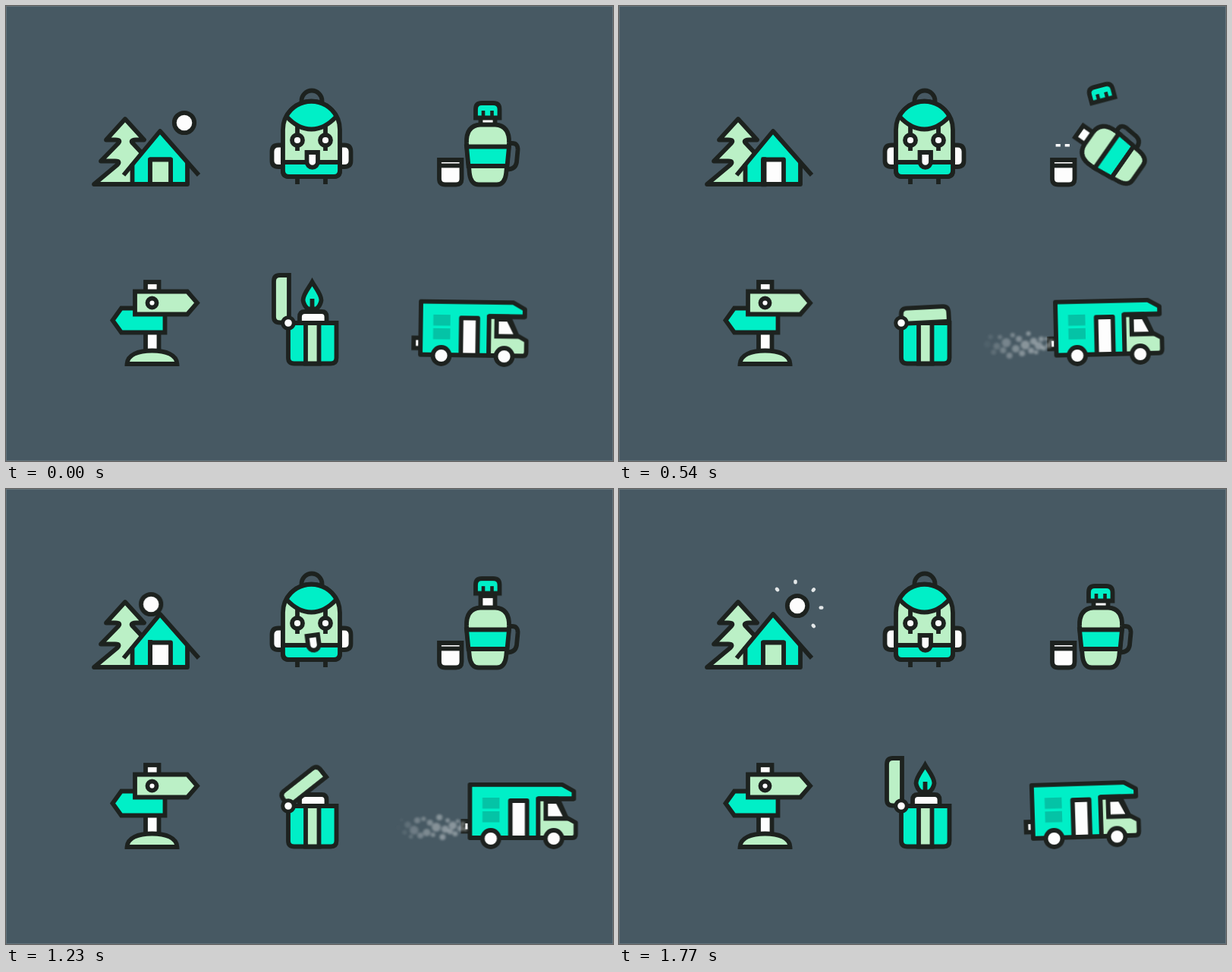
Recreate the animation shown at these times as an HTML page without scripts. Size 800 px wide and 600 px high, loop 1800 ms.

```html
<!DOCTYPE html>
<html lang="en">
<head>
<meta charset="utf-8">
<title>Camping icons</title>
<style>
html, body { margin: 0; width: 100%; height: 100%; overflow: hidden; background: #475963; }
svg { display: block; width: 100vw; height: 100vh; }
.ink { stroke: #1d221f; stroke-width: 5.8; fill: none; }
.teal { fill: #00efc7; }
.mint { fill: #bbf0c6; }
.white { fill: #fdfdfd; }
.round { stroke-linejoin: round; }
.move { animation: 1800ms linear infinite; }

.sun { animation-name: sun; }
@keyframes sun {
  0%, 1.7% { transform: none; }
  7% { transform: translate(-2px, 14px); }
  13.333% { transform: translate(-10px, 35px); }
  23% { transform: translate(-32px, 58px); }
  60% { transform: translate(-33px, 56px); }
  68.333% { transform: translate(-44px, -1.5px); }
  71% { transform: translate(-36px, -28px); }
  74% { transform: translate(-22px, -45px); }
  77% { transform: translate(-8px, -30px); }
  80%, 100% { transform: none; }
}
.rays { stroke: #eceff0; stroke-width: 4.6; stroke-linecap: round; fill: none; stroke-dasharray: 0 30; opacity: 0; animation-name: rays; }
@keyframes rays {
  0%, 79.4% { stroke-dasharray: .1 30; opacity: 0; }
  79.5% { stroke-dasharray: .1 30; opacity: 1; }
  84.5%, 91.5% { stroke-dasharray: 7.4 30; opacity: 1; }
  98.333% { stroke-dasharray: .8 30; opacity: 1; }
  99.5%, 100% { stroke-dasharray: .1 30; opacity: 0; }
}
.door { transform-origin: 190px 0; animation-name: door; }
.door * { vector-effect: non-scaling-stroke; }
@keyframes door {
  0%, 16.5% { transform: none; }
  31%, 78% { transform: scaleX(0.001); }
  87.8%, 100% { transform: none; }
}

.eye { transform-box: fill-box; transform-origin: center; animation-name: eye; }
@keyframes eye {
  0%, 32% { transform: none; }
  39%, 56% { transform: scale(.42); }
  63%, 100% { transform: none; }
}
.tongue { transform-origin: 404px 193px; animation-name: tongue; }
@keyframes tongue {
  0%, 61% { transform: none; }
  64.5% { transform: rotate(8deg); }
  68.333% { transform: rotate(-8deg); }
  73% { transform: rotate(8deg); }
  77% { transform: rotate(-7deg); }
  81% { transform: rotate(5deg); }
  85% { transform: rotate(-3deg); }
  89%, 100% { transform: none; }
}

.cap { transform-origin: 634.5px 137.5px; animation-name: cap; }
@keyframes cap {
  0%, 5% { transform: none; }
  13.333% { transform: translateY(-10px); }
  22% { transform: translateY(-25px); }
  30% { transform: translate(1px, -23px) rotate(-15deg); }
  36.5% { transform: translate(0, -26px) rotate(2deg); }
  43.333% { transform: translate(-1px, -23px) rotate(19deg); }
  52% { transform: translate(0, -25px) rotate(-14deg); }
  60% { transform: translateY(-24px); }
  68.333% { transform: translateY(-10px); }
  77%, 100% { transform: none; }
}
.flask { transform-origin: 635px 196px; animation-name: flask; }
@keyframes flask {
  0%, 16% { transform: none; animation-timing-function: ease-in-out; }
  28.5%, 49% { transform: translate(16.5px, 1px) rotate(-55deg); animation-timing-function: ease-in-out; }
  63%, 100% { transform: none; }
}
.drops { stroke: #fdfdfd; stroke-width: 6.2; fill: none; stroke-dasharray: 13 40; animation-name: drops; }
@keyframes drops {
  0%, 27% { stroke-dashoffset: 13; visibility: hidden; }
  27.1% { stroke-dashoffset: 13; visibility: visible; }
  48.7% { stroke-dashoffset: -13; visibility: visible; }
  48.8%, 100% { stroke-dashoffset: -13; visibility: hidden; }
}

.sign { transform-origin: 192.5px 391.5px; animation-name: sign; }
@keyframes sign {
  0%, 3% { transform: rotate(0); }
  8% { transform: rotate(24deg); }
  13.333% { transform: rotate(89deg); }
  18% { transform: rotate(178deg); }
  23% { transform: rotate(282deg); }
  30% { transform: rotate(360deg); }
  34% { transform: rotate(373deg); }
  39% { transform: rotate(352deg); }
  43.333% { transform: rotate(362deg); }
  48%, 71% { transform: rotate(360deg); }
  78% { transform: rotate(372deg); }
  85% { transform: rotate(351deg); }
  92% { transform: rotate(364deg); }
  97%, 100% { transform: rotate(360deg); }
}

.lid { transform-origin: 372px 418px; animation-name: lid; }
@keyframes lid {
  0%, 10% { transform: none; }
  13.333% { transform: rotate(1.5deg); }
  20% { transform: rotate(30deg); }
  27% { transform: rotate(90deg); }
  30% { transform: rotate(87deg); }
  33%, 59% { transform: rotate(90deg); }
  68.333% { transform: rotate(52deg); }
  77%, 100% { transform: none; }
}
.flame { transform-origin: 403.5px 400px; animation-name: flame; }
@keyframes flame {
  0%, 8% { transform: none; }
  13.333% { transform: scale(.92); }
  20%, 73% { transform: scale(0); }
  83% { transform: scale(1.05); }
  85%, 100% { transform: none; }
}

.drive { animation-name: drive; }
@keyframes drive {
  0% { transform: none; }
  13.333% { transform: translateX(11.5px); }
  30% { transform: translateX(30.5px); }
  43.333% { transform: translateX(46.5px); }
  60% { transform: translateX(65.8px); }
  68.333% { transform: translateX(65.5px); }
  85% { transform: translateX(36px); }
  98.333%, 100% { transform: none; }
}
.rock { transform-origin: 573.5px 461px; animation-name: rock; }
@keyframes rock {
  0% { transform: rotate(.8deg); }
  13.333% { transform: rotate(2deg); }
  30% { transform: rotate(-1.3deg); }
  43.333% { transform: rotate(-1.9deg); }
  55% { transform: rotate(1.2deg); }
  68.333% { transform: rotate(0); }
  76% { transform: rotate(1.5deg); }
  85% { transform: rotate(-1.9deg); }
  92% { transform: rotate(1.2deg); }
  98.333% { transform: rotate(-1.9deg); }
  100% { transform: rotate(.8deg); }
}
.smoke { fill: #eceff0; opacity: 0; animation-name: smoke; }
@keyframes smoke {
  0%, 3% { transform: none; opacity: 0; }
  13.333% { transform: translateX(11.5px); opacity: 1; }
  30% { transform: translateX(30.5px); }
  43.333% { transform: translateX(46.5px); }
  60% { transform: translateX(64px); }
  68.333% { transform: translateX(65.5px); opacity: 1; }
  85% { transform: translateX(67px); opacity: .9; }
  94%, 100% { transform: translateX(67px); opacity: 0; }
}
.smoke circle { animation: puff 450ms linear infinite; animation-delay: calc(var(--i) * -18.75ms); }
@keyframes puff {
  0% { transform: translate(542px, calc(444px + var(--y) * .3px)) scale(.7); opacity: .4; }
  40% { transform: translate(510px, calc(446px + var(--y) * 1px)); opacity: .42; }
  75% { transform: translate(475px, calc(446px + var(--y) * 1px)); opacity: .28; }
  100% { transform: translate(450px, calc(446px + var(--y) * .6px)) scale(.7); opacity: 0; }
}
</style>
</head>
<body>
<svg viewBox="0 0 800 600">
  <defs>
    <filter id="soft" x="-20%" y="-50%" width="140%" height="200%"><feGaussianBlur stdDeviation="1.8"/></filter>
  </defs>
  <rect width="800" height="600" fill="#475963"/>
  <rect x=".5" y=".5" width="799" height="599" fill="none" stroke="#64737b"/>

  <!-- tent -->
  <g class="ink">
    <path class="mint round" d="M157 149 L182 176.5 H171 Q162 177 168 182 L189 204.500 V235 H116 L146 210 Q152 204.500 144 204.500 H125 L147 182 Q153 176.500 144 176.500 H132 Z"/>
    <circle class="white move sun" cx="235" cy="154" r="13.200"/>
    <path class="teal" stroke="none" d="M166 235 V209 L203 165 L239 206 V235 Z"/>
    <path class="round" d="M166.500 208 V235 H239 V206"/>
    <path class="round" d="M155 223 L203 165 L254 223"/>
    <rect class="white round" x="190" y="202.500" width="27" height="32.500"/>
    <g class="move door"><rect class="mint round" x="190" y="202.500" width="27" height="32.500"/></g>
  </g>
  <path class="move rays" d="M232.500 122.500 v-8 m0 8 v8 M256.300 133 l6 -6 m-6 6 l-6 6 M266.500 156.500 h8 m-8 0 h-8 M256.300 180.500 l6 6 m-6 -6 l-6 -6 M208.500 132.500 l-6 -6 m6 6 l6 6"/>

  <!-- backpack -->
  <g class="ink">
    <path d="M389.500 128 V125 A13.500 13.500 0 0 1 416.500 125 V128"/>
    <path d="M384 225 V235 M421 225 V235"/>
    <path class="white" d="M365 183.500 H359 Q350.500 183.500 350.500 192 V204 Q350.500 212 359 212 H365 Z M440 183.500 H446 Q454.500 183.500 454.500 192 V204 Q454.500 212 446 212 H440 Z"/>
    <path class="mint" d="M365 163 A37.500 37.500 0 0 1 440 163 V217 Q440 225 432 225 H373 Q365 225 365 217 Z"/>
    <path class="teal" d="M365 206 H440 V217 Q440 225 432 225 H373 Q365 225 365 217 Z"/>
    <path class="teal round" d="M369.500 145.500 A37.500 37.500 0 0 1 435.500 145.500 Q420 162.500 402.500 162.500 Q385 162.500 369.500 145.500 Z"/>
    <path d="M384 158 V191 M421 158 V191"/>
    <circle class="white move eye" cx="384" cy="177" r="7"/>
    <circle class="white move eye" cx="421" cy="177" r="7"/>
    <path class="white move tongue" d="M396.500 193 H411 V205.500 A7.250 7.250 0 0 1 396.500 205.500 Z"/>
  </g>

  <!-- flask and cup -->
  <g class="ink">
    <g class="move flask">
      <path d="M662 181 H667 Q675 181 674.500 190 L673 206 Q671.500 215.500 660 215.500"/>
      <rect class="white" x="625.500" y="141" width="19" height="16"/>
      <path class="mint" d="M625 156.500 H645 Q664 158 663 181 L659 222 Q657 235.500 647 235.500 H623 Q613 235.500 611 222 L607 181 Q606 158 625 156.500 Z"/>
      <path class="teal" d="M607 185.500 H663 L660.500 211 H609.500 Z"/>
    </g>
    <g class="move cap">
      <path class="teal" d="M619 147.500 V136 Q619 128 627 128 H642 Q650.500 128 650.500 136 V147.500 Z"/>
      <path stroke-width="4.600" d="M629 148 V138 M640.500 148 V138"/>
    </g>
    <path class="white" d="M571 203 H600.500 V228 Q600.500 235.500 593 235.500 H579 Q571 235.500 571 228 Z"/>
    <path d="M571 210.500 H600"/>
  </g>
  <path class="move drops" d="M578.700 182 v13 M590.800 182 v13"/>

  <!-- signpost -->
  <g class="ink">
    <rect class="white" x="184" y="364" width="17.500" height="94"/>
    <path class="mint" d="M159.500 472 C160 460 174 454.500 192.500 454.500 C211 454.500 225 460 225.500 472 Z"/>
    <path class="teal" d="M209.500 398.500 V430.500 H152 L140.500 414.500 L152 398.500 Z"/>
    <g class="move sign">
      <path class="mint" d="M170 376.500 H239 L252 391.500 L239 406.500 H170 Z"/>
      <circle class="white" cx="192.500" cy="391.500" r="6"/>
    </g>
  </g>

  <!-- lighter -->
  <g class="ink">
    <g class="move flame">
      <path class="teal" d="M403.500 364 C399 372 391.500 380 391.500 388 Q392.500 395 398 399.500 H409 Q414.500 395 415.500 388 C415.500 380 408 372 403.500 364 Z"/>
      <path d="M403.500 386 V401"/>
    </g>
    <path class="white" d="M387 418 V410 Q387 403 394 403 H416 Q422.500 403 422.500 410 V418 Z"/>
    <path class="teal" d="M372 418 H435.500 V464 Q435.500 471.500 428 471.500 H380 Q372 471.500 372 464 Z"/>
    <path class="mint" d="M395 418 H412.500 V471.500 H395 Z"/>
    <path class="mint move lid" d="M373 355 H361 Q353 355 353 363 V410 Q353 417.500 361 417.500 H373 Z"/>
    <circle class="white" cx="372" cy="418" r="7.300" stroke-width="5"/>
  </g>

  <!-- camper -->
  <g class="ink move drive">
    <g class="move rock">
      <rect class="white" x="537" y="438" width="9" height="13.500"/>
      <path class="teal round" d="M546 389.800 H667.500 L683 398.500 V408.500 H636 V460 H546 Z"/>
      <path class="mint round" d="M636 408.500 H662 L673 433 L685.500 440 V455 Q685.500 460 681 460 H636 Z"/>
      <path class="white" d="M646 412 H661.500 L673 434.500 H646 Z"/>
      <path d="M636 408.500 H683"/>
      <rect fill="#04c3a6" stroke="none" x="562.500" y="407" width="22.500" height="14.500"/>
      <rect fill="#04c3a6" stroke="none" x="562.500" y="425" width="22.500" height="14.500"/>
      <path class="white round" d="M599.300 460 V411 H621.300 V460 Z"/>
      <circle class="white" cx="573.500" cy="461" r="11"/>
      <circle class="white" cx="656.500" cy="461" r="11"/>
    </g>
  </g>
  <g class="move smoke" filter="url(#soft)">
    <circle r="4" style="--i:0;--y:-9"/>
    <circle r="6" style="--i:1;--y:4"/>
    <circle r="3" style="--i:2;--y:14"/>
    <circle r="5" style="--i:3;--y:-4"/>
    <circle r="4" style="--i:4;--y:9"/>
    <circle r="3" style="--i:5;--y:-14"/>
    <circle r="6" style="--i:6;--y:1"/>
    <circle r="4" style="--i:7;--y:12"/>
    <circle r="4" style="--i:8;--y:-7"/>
    <circle r="5" style="--i:9;--y:6"/>
    <circle r="3" style="--i:10;--y:-12"/>
    <circle r="4" style="--i:11;--y:15"/>
    <circle r="6" style="--i:12;--y:-2"/>
    <circle r="4" style="--i:13;--y:8"/>
    <circle r="3" style="--i:14;--y:-10"/>
    <circle r="5" style="--i:15;--y:3"/>
    <circle r="4" style="--i:16;--y:13"/>
    <circle r="4" style="--i:17;--y:-13"/>
    <circle r="6" style="--i:18;--y:0"/>
    <circle r="3" style="--i:19;--y:10"/>
    <circle r="4" style="--i:20;--y:-6"/>
    <circle r="5" style="--i:21;--y:7"/>
    <circle r="3" style="--i:22;--y:-11"/>
    <circle r="4" style="--i:23;--y:11"/>
  </g>
</svg>
</body>
</html>
```
